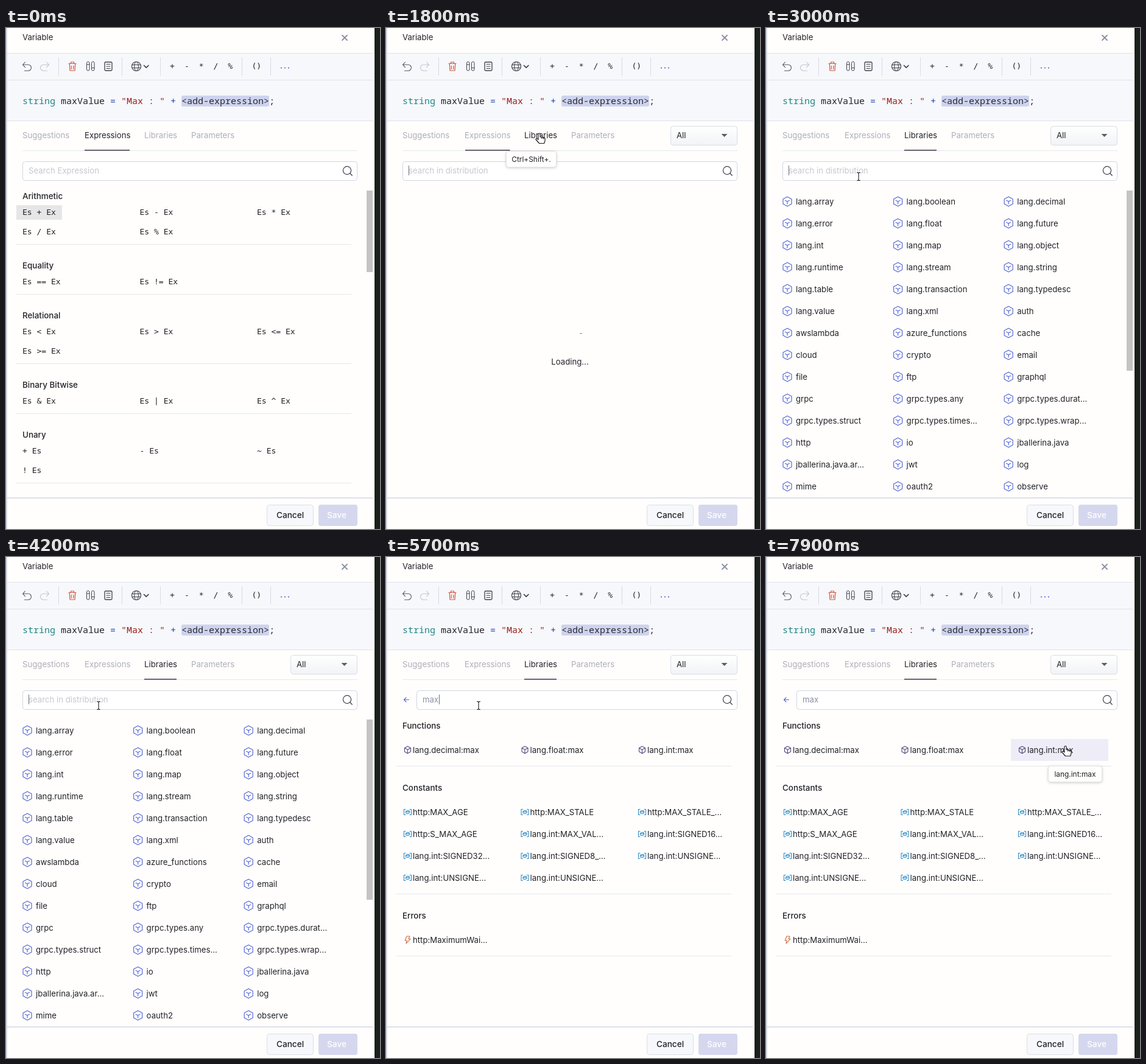
These frames come from a looping animation (614x823 px, 8 s). An HTML page:

```html
<!DOCTYPE html>
<html lang="en">
<head>
<meta charset="utf-8">
<title>Expression editor</title>
<style>
html, body { margin: 0; width: 100%; height: 100%; overflow: hidden; background: #fffefd; }
svg { display: block; width: 614px; height: 823px; }
text { font: 13.2px Inter, sans-serif; fill: #222228; white-space: pre; }
.head { font-weight: 500; font-size: 13.4px; }
.mono { font: 13px "DejaVu Sans Mono", monospace; }
.code { font: 15px "Noto Sans Mono", monospace; }
.tip { font-size: 11.9px; }
.hint { fill: #c6c7cf; }
.typed { fill: #8d91a3; }
.btn { font-weight: 500; font-size: 13.6px; }
.shadow { filter: drop-shadow(0 1px 2px #0003); }
</style>
</head>
<body>
<svg id="stage" viewBox="0 0 614 823"></svg>
<script>
const LOOP = 8000;
const stage = document.getElementById("stage");
const BLUE = "#5567d5", INK = "#40404b", RULE = "#e6e7ec", MUTED = "#adaeb8", BLACK = "#222228";

function add(parent, tag, attrs = {}, content) {
  const el = document.createElementNS("http://www.w3.org/2000/svg", tag);
  for (const k in attrs) el.setAttribute(k, attrs[k]);
  if (content !== undefined) el.textContent = content;
  parent.append(el);
  return el;
}
const group = (parent = stage, attrs) => add(parent, "g", attrs);
const rect = (p, x, y, width, height, fill, more) => add(p, "rect", { x, y, width, height, fill, ...more });
const text = (p, x, y, s, cls = "", more) => add(p, "text", { x, y, class: cls, ...more }, s);
const line = (p, d, stroke = INK, width = 1.1, more) =>
  add(p, "path", { d, stroke, "stroke-width": width, fill: "none", "stroke-linecap": "round", "stroke-linejoin": "round", ...more });
const box = (p, x, y, w, h, fill, stroke, more) =>
  rect(p, x + .5, y + .5, w - 1, h - 1, fill, { rx: 4, stroke, ...more });

// Window frame
rect(stage, 0, 0, 614, 823, "#fffefd");
rect(stage, 2, 42, 600, 110, "#f7f8fb");
for (const y of [41, 85, 152]) rect(stage, 2, y, 600, 1, "#dfe2ea");
rect(stage, 2, 771, 600, 2, "#dfe1e9");
rect(stage, 0, 0, 2, 823, "#d7d9e4");
rect(stage, 605, 0, 9, 823, "#1a201c");
text(stage, 27, 20, "Variable");
line(stage, "M552 12l8 8M560 12l-8 8", "#8d91a3", 1.9);

// Toolbar
for (const x of [86, 190, 253, 387, 434]) rect(stage, x, 48, 1, 30, "#d9dbe4");
line(stage, "M31.500 56l-4 4.300 4 4.300M28 60.300h8.500a4.900 4.900 0 0 1 0 9.900h-6", "#5a5b66");
line(stage, "M66.500 56l4 4.300-4 4.300M70 60.300h-8.500a4.900 4.900 0 0 0 0 9.900h6", "#c4c6d0");
line(stage, "M103 58.500h12M106.500 58v-2h5v2M104.300 59l.7 11h8l.7-11M107.300 62v5.500M110.700 62v5.500", "#d0563f", 1.2);
for (const x of [132.5, 140.5]) {
  rect(stage, x, 55.5, 4.5, 14.5, "none", { rx: 2, stroke: INK });
  line(stage, `M${x} ${x < 140 ? 60 : 65.500}h4.500`, INK, 1);
}
rect(stage, 162, 56, 12, 14, "none", { rx: 1.5, stroke: INK, "stroke-width": 1.3 });
line(stage, "M165 59.500h6M165 63h6M165 66.500h6", INK, 1.2);
add(stage, "circle", { cx: 214, cy: 63, r: 7.5, fill: "none", stroke: INK, "stroke-width": 1.2 });
add(stage, "ellipse", { cx: 214, cy: 63, rx: 3.4, ry: 7.5, fill: "none", stroke: INK });
line(stage, "M207.300 60.500h13.400M207.300 65.500h13.400", INK, 1);
line(stage, "M226.500 61.500l3.700 3.700 3.700-3.700", INK, 1.7);
[..."+-*/%"].forEach((c, i) => text(stage, 273 + 23.8 * i, 67, c, "mono", { "text-anchor": "middle" }));
text(stage, 403.5, 67, "()", "mono");
for (const x of [452, 458, 464]) add(stage, "circle", { cx: x, cy: 65.5, r: 1.1, fill: BLUE });

// Statement
rect(stage, 288, 111, 144, 18, "#ced3ee", { rx: 3 });
const code = text(stage, 27, 125, "", "code");
[["string", "#1f8585"], [" maxValue ", BLACK], ["= ", "#1d3fb4"], ["\"Max : \"", "#982020"],
 [" + ", "#1d3fb4"], ["<add-expression>;", "#2b2b33"]]
  .forEach(([s, color]) => add(code, "tspan", { style: `fill:${color}` }, s));

// Tabs
rect(stage, 27, 201, 550, 1, RULE);
const [, expTab, libTab] = [[27, "Suggestions"], [129, "Expressions"], [227, "Libraries"], [304, "Parameters"]]
  .map(([x, s]) => text(stage, x, 181, s));
for (const el of stage.querySelectorAll("text")) {
  if (/^(Sugg|Param)/.test(el.textContent)) el.style.fill = MUTED;
}
const marker = rect(stage, 129, 200, 74, 1.4, "#30303a");

const select = group();
add(select, "linearGradient", { id: "sel", x2: 0, y2: 1 }).innerHTML =
  '<stop stop-color="#fff"/><stop offset="1" stop-color="#f2f3f6"/>';
box(select, 467, 161, 110, 32, "url(#sel)", "#d9dce5");
text(select, 477, 181, "All");
add(select, "path", { d: "M550.500 174h10l-5 5z", fill: "#5c5d68" });

// Search field
const field = box(stage, 27, 219, 550, 32, "#fff", "#d3d6e0");
add(stage, "circle", { cx: 560, cy: 234, r: 6.6, fill: "none", stroke: INK, "stroke-width": 1.2 });
line(stage, "M564.800 238.800l3.400 3.400", INK, 1.3);
const input = text(stage, 37, 239, "");
const caret = rect(stage, 37, 226, 1, 16, "#70717c");

const rule = (p, y) => rect(p, 17, y, 550, 1, RULE);
const thumb = (p, h) => rect(p, 592, 267, 10, h, "#c4c4c5");

// Expressions page
const expPage = group();
rect(expPage, 17, 291, 75, 24, "#e7e6e6");
let y = 276;
for (const [title, items] of [
  ["Arithmetic", "Es + Ex,Es - Ex,Es * Ex,Es / Ex,Es % Ex"],
  ["Equality", "Es == Ex,Es != Ex"],
  ["Relational", "Es < Ex,Es > Ex,Es <= Ex,Es >= Ex"],
  ["Binary Bitwise", "Es & Ex,Es | Ex,Es ^ Ex"],
  ["Unary", "+ Es,- Es,~ Es,! Es"]]) {
  const list = items.split(",");
  text(expPage, 27, y + 5, title, "head");
  list.forEach((s, i) => text(expPage, [27, 219.5, 412][i % 3], y + 31 + 32 * Math.floor(i / 3), s, "mono"));
  y += 47 + 32 * Math.floor((list.length - 1) / 3);
  rule(expPage, y);
  y += 35;
}
thumb(expPage, 134);

// Loading page
const loadPage = group();
rect(loadPage, 318, 501, 4, 1.5, "#a5a6b0");
text(loadPage, 302, 553, "Loading...", "", { "text-anchor": "middle" });

// Libraries page
const libPage = group();
const libs = ("array boolean decimal error float future int map object runtime stream string table " +
  "transaction typedesc value xml").split(" ").map(s => "lang." + s).concat(
  ("auth awslambda azure_functions cache cloud crypto email file ftp graphql grpc grpc.types.any " +
  "grpc.types.durat... grpc.types.struct grpc.types.times... grpc.types.wrap... http io jballerina.java " +
  "jballerina.java.ar... jwt log mime oauth2 observe").split(" "));
libs.forEach((s, i) => {
  const x = 35 + 181.6 * (i % 3), y = 285 + 36 * Math.floor(i / 3);
  line(libPage, "M0-7.800l7 3.900v7.800l-7 3.900-7-3.900v-7.800zM-3.500-1.800L0 0l3.500-1.800M0 0v4", BLUE, 1.2,
    { transform: `translate(${x} ${y})` });
  text(libPage, x + 14, y + 5, s);
});
thumb(libPage, 296);

// Results page
const resPage = group();
line(resPage, "M37.500 234.500h-8M33 231l-3.500 3.500 3.500 3.500", BLUE, 1.2);
const hover = rect(resPage, 402, 299, 160, 36, "#eeedf7");
const icons = {
  Functions: ["M0-6l5 2.800v6L0 5.800-5 2.800v-6zM-5-3.200L0-.4l5-2.800M0-.4v6.200", "#54497f"],
  Constants: ["M-3.500-4.500h-2.500v9h2.500M3.500-4.500h2.500v9h-2.500M-3-1l3-1.800 3 1v3l-3 1.600-3-1zM-3-1l3 1 3-1.500", "#2f8cc9"],
  Errors: ["M-1.500-6h5l-2 4.300h3L-2.500 6l1.200-5h-3z", "#cf6b40"]
};
y = 277;
for (const [title, items] of [
  ["Functions", "lang.decimal:max lang.float:max lang.int:max"],
  ["Constants", "http:MAX_AGE http:MAX_STALE http:MAX_STALE_... http:S_MAX_AGE lang.int:MAX_VAL... " +
    "lang.int:SIGNED16... lang.int:SIGNED32... lang.int:SIGNED8_... lang.int:UNSIGNE... " +
    "lang.int:UNSIGNE... lang.int:UNSIGNE..."],
  ["Errors", "http:MaximumWai..."]]) {
  const list = items.split(" "), [d, color] = icons[title];
  text(resPage, 27, y + 5, title, "head");
  list.forEach((s, i) => {
    const x = 44 + 192.5 * (i % 3), cy = y + 40 + 36 * Math.floor(i / 3);
    line(resPage, d, color, 1.1, { transform: `translate(${x - 8.5} ${cy})` });
    text(resPage, x, cy + 5, s);
  });
  y += 66 + 36 * Math.floor((list.length - 1) / 3);
  rule(resPage, y);
  y += 36;
}

// Footer
box(stage, 428, 783, 77, 35, "#f7f8fb", "#dcdfe7");
text(stage, 466.5, 805, "Cancel", "btn", { "text-anchor": "middle" });
rect(stage, 513, 783, 64, 35, "#d5d7ee", { rx: 4 });
text(stage, 543, 805, "Save", "btn", { "text-anchor": "middle", style: "fill:#fff" });

// Tooltips and pointer
function tooltip(x, y, w, label) {
  const g = group();
  box(g, x, y, w, 27, "#fffefd", "#e3e4ea", { class: "shadow" });
  text(g, x + w / 2, y + 17.5, label, "tip", { "text-anchor": "middle" });
  return g;
}
const keyTip = tooltip(197, 202, 83, "Ctrl+Shift+.");
const nameTip = tooltip(463, 343, 89, "lang.int:max");

const hand = group();
line(hand, "M-1.600 1.600a1.600 1.600 0 0 1 3.200 0V5.800l5.600 1.100q2.400.5 2.400 2.600v2.300l-1.400 4.700h-8.200l-5.200-6q-.8-1.200.4-1.800 1.200-.4 2.100.5l1.100 1.100zM4.300 6.500v2M7 7.100v2",
  "#1c1c20", 1.2, { fill: "#fff" });
const beam = group();
const beamPath = "M-2.500-6.500h1.500l1 1 1-1h1.500M0-5.500v11M-2.500 6.500h1.500l1-1 1 1h1.500";
line(beam, beamPath, "#fff", 2.6);
line(beam, beamPath, "#1c1c20", 1.1);

// Step tables: [from ms, value...]
const pages = [[0, expPage], [1800, loadPage], [2000, libPage], [5700, resPage]];
const moves = [[0, null], [700, hand, 262, 214], [800, hand, 259, 211], [900, hand, 256, 207],
  [1000, hand, 254.5, 204.5], [1100, hand, 253, 190], [1200, hand, 252, 176], [1300, hand, 251.5, 173],
  [2300, hand, 241, 186], [2400, hand, 222, 206], [2500, beam, 204, 228], [2900, beam, 168, 240],
  [3000, beam, 152, 244], [6600, beam, 176, 245], [6700, hand, 238, 259], [6800, hand, 322, 279],
  [6900, hand, 408, 298], [7000, hand, 462, 307], [7100, hand, 486, 310], [7200, hand, 491.5, 310.5]];
const slide = [[0, 129, 74], [1800, 130, 73.5], [2000, 218, 56], [2100, 227, 53]];
const typed = [[0, "Search Expression"], [1800, "search in distribution"], [4800, "ma"], [5200, "max"]];
const blink = [[0, 0], [1800, 1], [2400, 0], [3000, 1], [3600, 0], [4200, 1], [6000, 0], [6400, 1],
  [7000, 0], [7600, 1], [7900, 0]];

const at = (steps, t) => steps.findLast(s => s[0] <= t).slice(1);
const show = (el, on) => { el.style.display = on ? "" : "none"; };

function draw(t) {
  const [page] = at(pages, t);
  for (const [, p] of pages) show(p, p === page);
  const clicked = t >= 1800, found = page === resPage;
  expTab.style.fill = clicked ? MUTED : BLACK;
  libTab.style.fill = clicked ? BLACK : MUTED;
  show(select, clicked);

  const [mx, mw] = at(slide, t);
  marker.setAttribute("x", mx);
  marker.setAttribute("width", mw);

  const left = found ? 50 : 27;
  field.setAttribute("x", left + .5);
  field.setAttribute("width", 576 - left);
  const [value] = at(typed, t);
  input.textContent = value;
  input.setAttribute("class", t < 4800 ? "hint" : "typed");
  input.setAttribute("x", left + 10);
  caret.setAttribute("x", left + (t < 4800 ? 10 : t < 5200 ? 30 : 37));
  show(caret, at(blink, t)[0]);

  const [kind, x, y] = at(moves, t);
  for (const c of [hand, beam]) show(c, c === kind);
  if (kind) kind.setAttribute("transform", `translate(${x} ${y})`);
  show(hover, t >= 7000);
  show(keyTip, t >= 1300 && t < 2300);
  show(nameTip, t >= 7200);
}

function tick() {
  draw(performance.now() % LOOP);
  requestAnimationFrame(tick);
}
tick();
</script>
</body>
</html>
```
